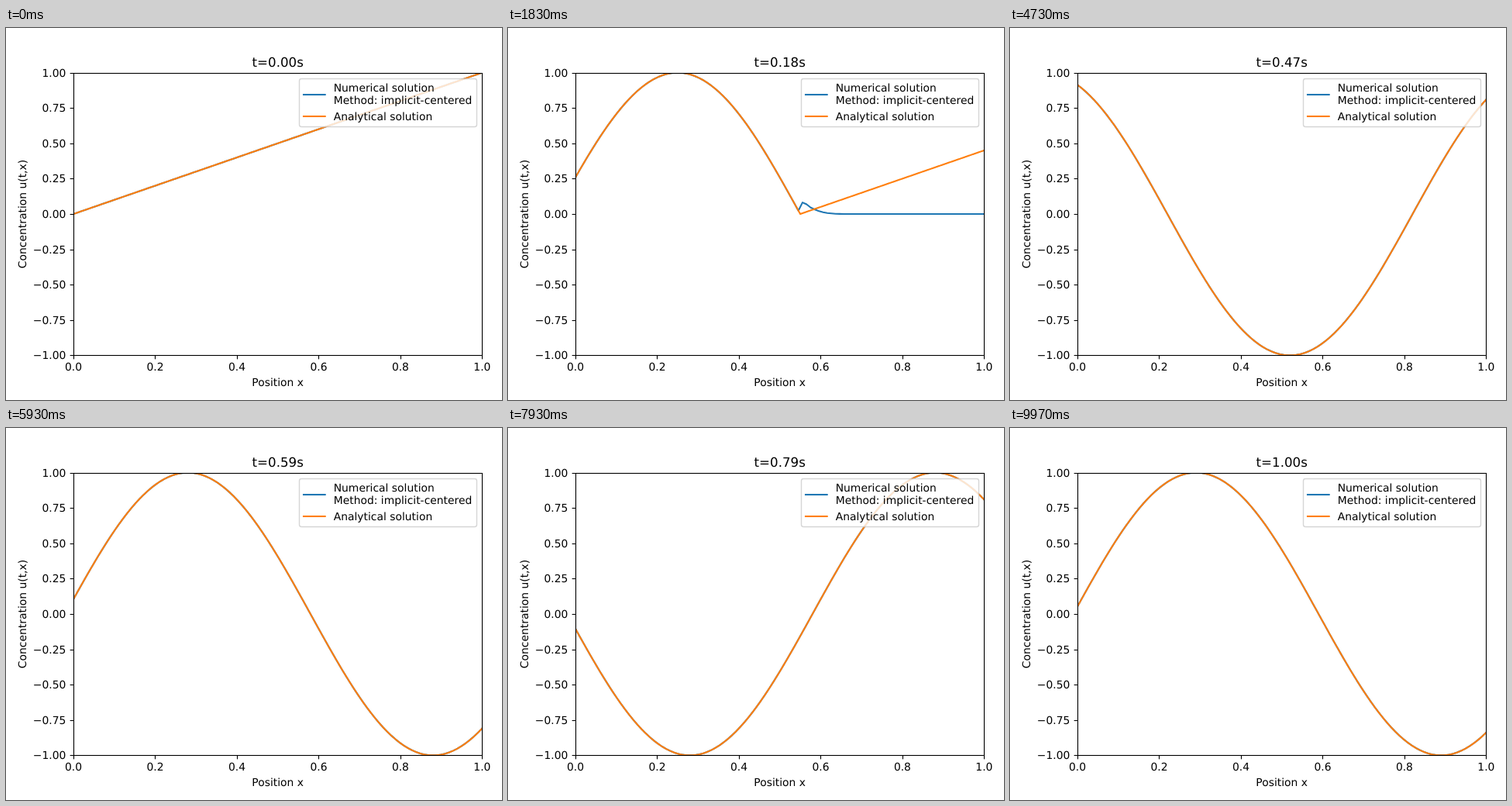
An HTML page for the animation above (10000 ms loop, 640x480 px).

```html
<!DOCTYPE html>
<html lang="en">
<head>
<meta charset="utf-8">
<title>Advection: numerical and analytical solution</title>
<style>
html, body { margin: 0; width: 100%; height: 100%; overflow: hidden; background: #fff; }
svg { display: block; }
text { font: 13.889px "DejaVu Sans", sans-serif; text-rendering: geometricPrecision; white-space: pre; }
#title { font-size: 16.667px; }
.mid { text-anchor: middle; }
.end { text-anchor: end; }
.line { fill: none; stroke-width: 2.083; stroke-linejoin: round; stroke-linecap: square; }
.num { stroke: #1f77b4; }
.ana { stroke: #ff7f0e; }
.axis { fill: none; stroke: #000; stroke-width: 1.111; }
</style>
</head>
<body>
<svg width="640" height="480" viewBox="0 0 640 480">
  <clipPath id="area"><rect x="87" y="58" width="527" height="364"/></clipPath>
  <g clip-path="url(#area)">
    <path id="num" class="line num"/>
    <path id="ana" class="line ana"/>
  </g>
  <g id="ticks"></g>
  <rect class="axis" x="87.5" y="58.5" width="527" height="364"/>
  <text id="title" class="mid" x="350.7" y="50"></text>
  <text class="mid" x="350.7" y="462">Position x</text>
  <text class="mid" transform="translate(26 240) rotate(-90)">Concentration u(t,x)</text>
  <rect x="378.5" y="65.5" width="229" height="62" rx="2.8" fill="#fff" stroke="#ccc" stroke-width="1.389" opacity=".8"/>
  <path class="line num" d="M384 86H411.7"/>
  <path class="line ana" d="M384 114H411.7"/>
  <text x="422.7" y="82">Numerical solution</text>
  <text x="422.7" y="98">Method: implicit-centered</text>
  <text x="422.7" y="119">Analytical solution</text>
</svg>
<script>
const SPEED = 3, RATE = 300, STEPS = 300, CELLS = 99;
const $ = id => document.getElementById(id);
const px = x => 87 + 527.4 * x;
const py = u => 240 - 182.4 * u;
const snap = v => Math.floor(v + 0.5) + 0.5;

// Inflow wave behind the front, shifted ramp ahead of it
function exact(x, t) {
  const front = SPEED * t;
  return x < front ? Math.sin(5 * Math.PI * (t - x / SPEED)) : x - front;
}

// Solves a tridiagonal system with rows (k, 1, -k)
function solve(rhs, k) {
  const n = rhs.length, up = [], out = [];
  for (let j = 0; j < n; j++) {
    const m = 1 + (j ? -k * up[j - 1] : 0);
    up[j] = -k / m;
    out[j] = (rhs[j] - (j ? k * out[j - 1] : 0)) / m;
  }
  for (let j = n - 2; j >= 0; j--) out[j] -= up[j] * out[j + 1];
  return out;
}

function simulate() {
  const k = SPEED / RATE * CELLS / 2;
  let u = Array.from({ length: CELLS + 1 }, (_, j) => j / CELLS);
  const runs = [u];
  for (let i = 1; i < STEPS; i++) {
    const t = i / RATE;
    u = solve(u, k).map((v, j) => j / CELLS <= SPEED * t ? exact(j / CELLS, t) : v);
    runs.push(u);
  }
  return runs;
}

const toPath = values => "M" + values.map((u, j) =>
  px(j / (values.length - 1)).toFixed(2) + " " + py(u).toFixed(2)).join("L");

function addTicks() {
  let html = "";
  for (let j = 0; j <= 5; j++) {
    const x = px(j / 5);
    html += `<path class="axis" d="M${snap(x)} 422.5v4.86"/>` +
      `<text class="mid" x="${x}" y="442">${(j / 5).toFixed(1)}</text>`;
  }
  for (let j = -4; j <= 4; j++) {
    const y = py(j / 4);
    html += `<path class="axis" d="M87.5 ${snap(y)}h-4.86"/>` +
      `<text class="end" x="77.3" y="${Math.round(y + 5)}">${(j / 4).toFixed(2).replace("-", "\u2212")}</text>`;
  }
  $("ticks").innerHTML = html;
}

const runs = simulate();
let shown = -1;

function draw() {
  const ms = Math.floor(performance.now() % 10000 / 10) * 10;
  const step = Math.floor((ms + 5) * 0.03);
  if (step !== shown) {
    shown = step;
    const t = step / RATE;
    $("title").textContent = `t=${t.toFixed(2)}s`;
    $("num").setAttribute("d", toPath(runs[step]));
    $("ana").setAttribute("d", toPath(Array.from({ length: 501 }, (_, j) => exact(j / 500, t))));
  }
  requestAnimationFrame(draw);
}

addTicks();
draw();
</script>
</body>
</html>
```
